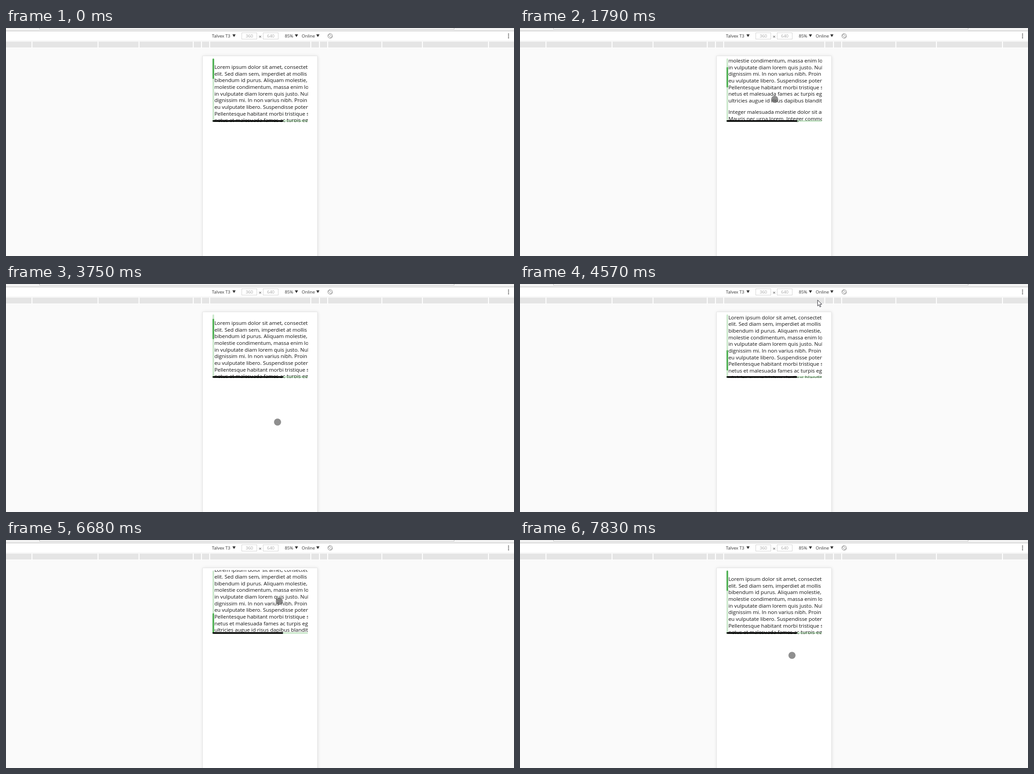
An HTML page with a canvas that plays this animation: 1115x502 px, repeating every 7.99 s.

```html
<!DOCTYPE html>
<html lang="en">
<head>
<meta charset="utf-8">
<title>Custom scrollbars on a touch device</title>
<style>
html, body { margin: 0; width: 100%; height: 100%; overflow: hidden; background: #fafafa; }
canvas { display: block; }
</style>
</head>
<body>
<canvas id="stage" width="1115" height="502"></canvas>
<script>
const ctx = document.getElementById('stage').getContext('2d');
const W = 1115, H = 502, LOOP = 7990;
const FONT = '"Open Sans", "Noto Sans", sans-serif';
const LINE = 14.65, PARAGRAPH_GAP = 10.7;
const MAX_X = 74, MAX_Y = 290, THUMB_LAG = 86;

const lorem = `Lorem ipsum dolor sit amet, consectetur adipiscing
elit. Sed diam sem, imperdiet at mollis vestibulum,
bibendum id purus. Aliquam molestie, leo sed
molestie condimentum, massa enim lobortis massa,
in vulputate diam lorem quis justo. Nullam nec
dignissim mi. In non varius nibh. Proin et eros nisi,
eu vulputate libero. Suspendisse potenti.
Pellentesque habitant morbi tristique senectus et
netus et malesuada fames ac turpis egestas. Duis
ultricies augue id risus dapibus blandit.`;
const integer = `Integer malesuada molestie dolor sit amet viverra.
Mauris nec urna lorem. Integer commodo, felis
vel tempor sodales, nunc nulla varius purus, a
pellentesque. Cras non faucibus est. Mauris
risus mollis nisl mollis ac mattis mi volutpat.
Vivamus ac rutrum elit. Suspendisse semper,
vitae sapien sollicitudin mattis.`;
const paragraphs = [lorem, integer, lorem].map(text => text.split('\n'));

// Turning points of the pointer: time, x, y
const turns = [
  [230, 976, 461], [530, 618, 208], [700, 618, 208], [1100, 578, 149],
  [1790, 559, 157], [2080, 562, 32], [2970, 566, 283], [3380, 578, 100],
  [3750, 596, 304], [4400, 645, 30], [4750, 661, 40], [5360, 331, 116],
  [6130, 750, 129], [6680, 600, 135], [7000, 604, 228], [7450, 602, 150],
  [7760, 597, 254]
];

// Each flick adds a distance: start, duration, distance
const flicksY = [
  [700, 400, 58], [1810, 540, MAX_Y - 58], [2450, 350, -74],
  [3380, 370, 74 - MAX_Y], [4100, 520, MAX_Y], [6720, 570, -MAX_Y]
];
const flicksX = [[4970, 210, MAX_X], [5610, 210, -MAX_X]];

function ease(p) {
  p = Math.min(1, Math.max(0, p));
  return p * p * (3 - 2 * p);
}

function scrolled(flicks, t) {
  return flicks.reduce((sum, [start, length, by]) => sum + by * ease((t - start) / length), 0);
}

function pointerAt(t) {
  const next = turns.findIndex(turn => turn[0] > t);
  if (next < 0) return turns[turns.length - 1].slice(1);
  const [t0, x0, y0] = turns[next - 1], [t1, x1, y1] = turns[next];
  const p = ease((t - t0) / (t1 - t0));
  return [x0 + (x1 - x0) * p, y0 + (y1 - y0) * p];
}

function rect(x, y, w, h, color) {
  ctx.fillStyle = color;
  ctx.fillRect(x, y, w, h);
}

function pill(x, y, w, h, color) {
  ctx.fillStyle = color;
  ctx.beginPath();
  ctx.roundRect(x, y, w, h, 1.7);
  ctx.fill();
}

function frameBox(x, y, w, h, color) {
  ctx.strokeStyle = color;
  ctx.lineWidth = 1;
  ctx.strokeRect(x + 0.5, y + 0.5, w, h);
}

function label(text, x, y, color = '#333', size = 9.5) {
  ctx.font = `${size}px ${FONT}`;
  ctx.fillStyle = color;
  ctx.fillText(text, x, y);
}

function dot(x, y, r, color) {
  ctx.fillStyle = color;
  ctx.beginPath();
  ctx.arc(x, y, r, 0, Math.PI * 2);
  ctx.fill();
}

function menu(text, x, arrowX) {
  label(text, x, 21);
  ctx.beginPath();
  ctx.moveTo(arrowX, 14);
  ctx.lineTo(arrowX + 7, 14);
  ctx.lineTo(arrowX + 3.5, 20);
  ctx.fill();
}

function sizeBox(text, x) {
  frameBox(x, 10, 33, 14, '#d4d4d4');
  label(text, x + 9, 21, '#a6a6a6');
}

function rotateIcon(x, y) {
  ctx.save();
  ctx.translate(x, y);
  ctx.rotate(Math.PI / 4);
  ctx.strokeStyle = '#777';
  ctx.lineWidth = 0.9;
  ctx.strokeRect(-4.5, -1.7, 9, 3.4);
  ctx.beginPath();
  ctx.arc(0, 0, 5, 0, Math.PI * 2);
  ctx.stroke();
  ctx.restore();
}

function drawChrome() {
  rect(0, 0, W, 6, '#f2f2f2');
  rect(73, 0, 911, 2, '#fff');
  frameBox(73, -10, 910, 12, '#bdbdbd');
  rect(0, 6, W, 1, '#b9b9b9');
  rect(0, 7, W, 37, '#fff');
  rect(0, 28, W, 1, '#ececec');

  menu('Talvex T3', 452, 497);
  menu('85%', 612, 634);
  menu('Online', 649, 681);
  sizeBox('360', 517);
  sizeBox('640', 564);
  label('×', 554.5, 22.5, '#555', 11.5);
  rotateIcon(711.5, 17.5);
  for (const y of [13.5, 17.5, 21.5]) dot(1103, y, 1.2, '#555');

  // Device width presets, mirrored around the middle
  rect(0, 30, W, 13, '#e5e5e5');
  for (const d of [111, 129.5, 147.5, 266.5, 356, 501]) {
    for (const x of [557 - d, 557 + d]) rect(Math.round(x), 30, 2, 13, '#fff');
  }
}

function drawDevice() {
  rect(0, 44, W, H - 44, '#fafafa');
  ctx.save();
  ctx.shadowColor = 'rgba(0,0,0,.13)';
  ctx.shadowBlur = 7;
  rect(432, 62, 252, 460, '#fff');
  ctx.restore();
  frameBox(431, 61, 252, 460, '#e6e6e6');
}

function drawText(left, top) {
  let y = 90 - top;
  for (const lines of paragraphs) {
    for (const line of lines) {
      label(line, 457.4 - left, Math.round(y), '#111', 11.46);
      y += LINE;
    }
    y += PARAGRAPH_GAP;
  }
}

function drawScroller(t) {
  ctx.save();
  ctx.beginPath();
  ctx.rect(453, 66, 210, 141);
  ctx.clip();
  drawText(scrolled(flicksX, t), scrolled(flicksY, t));

  const across = scrolled(flicksX, t - THUMB_LAG) / MAX_X;
  const down = scrolled(flicksY, t - THUMB_LAG) / MAX_Y;
  const tint = 'rgba(76,175,80,.3)';
  pill(453.3, 67, 3.5, 139.5, tint);
  pill(453.3, 203, 209.5, 3.5, tint);
  pill(453.3, 67.2 + 94 * down, 3.5, 45, '#4caf50');
  pill(453.3 + 54.3 * across, 203, 155, 3.5, '#000');
  ctx.restore();
}

function drawArrow(x, y) {
  const arrow = new Path2D('M0 0V13L3 10.3 5 15.2 7.2 14.3 5.1 9.5 9.3 9.3Z');
  ctx.save();
  ctx.translate(x + 0.5, y + 0.5);
  ctx.fillStyle = '#fff';
  ctx.fill(arrow);
  ctx.strokeStyle = '#26262e';
  ctx.lineWidth = 1;
  ctx.stroke(arrow);
  ctx.restore();
}

function drawPointer(t) {
  if (t < turns[0][0]) return;
  const [x, y] = pointerAt(t);
  const onDevice = x > 432 && x < 684 && y > 62;
  if (onDevice) dot(x, y, 7.8, 'rgba(75,75,75,.62)');
  else drawArrow(x, y);
}

const begin = performance.now();

function frame() {
  const t = (performance.now() - begin) % LOOP;
  drawChrome();
  drawDevice();
  drawScroller(t);
  drawPointer(t);
  requestAnimationFrame(frame);
}
frame();
</script>
</body>
</html>
```
